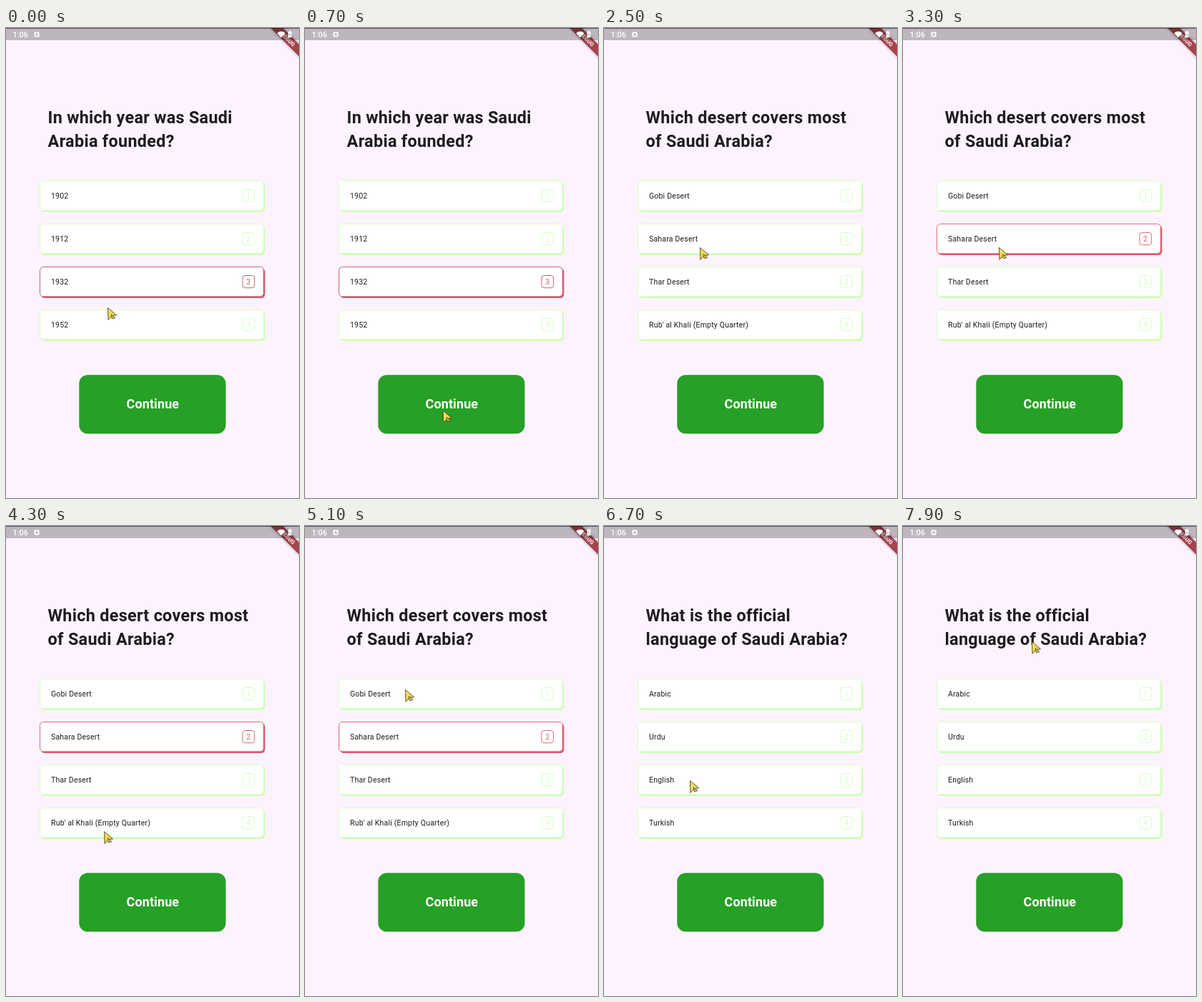
These frames come from a looping animation (410x656 px, 8 s). An HTML page:

```html
<!DOCTYPE html>
<html lang="en">
<head>
<meta charset="utf-8">
<title>Quiz</title>
<style>
  html, body { margin: 0; width: 100%; height: 100%; overflow: hidden; background: #fdf3ff; }
  svg { display: block; width: 410px; height: 656px; font-family: Roboto, sans-serif; }
  .title { font-size: 23.4px; font-weight: 700; letter-spacing: .29px; fill: #1d1b20; }
  .label { font-size: 10.5px; letter-spacing: .19px; fill: #1d1b20; }
  .num { font-size: 10.5px; text-anchor: middle; }
</style>
</head>
<body>
<svg viewBox="0 0 410 656">
  <defs>
    <linearGradient id="gold" x1="0" y1="0" x2="1" y2="1">
      <stop offset="0" stop-color="#f3e96b"/>
      <stop offset="1" stop-color="#e9c53c"/>
    </linearGradient>
    <filter id="soft" x="-20%" y="-100%" width="140%" height="300%">
      <feGaussianBlur stdDeviation="2"/>
    </filter>
  </defs>
  <rect width="410" height="656" fill="#fdf3ff"/>
  <text class="title" x="58.6" y="132.8"></text>
  <text class="title" x="58.6" y="166.1"></text>
  <g id="cards"></g>
  <rect x="102.3" y="484.2" width="205.2" height="82" rx="12" fill="#26a026"/>
  <text x="205.4" y="531.4" font-size="18" font-weight="700" letter-spacing=".1" text-anchor="middle" fill="#fff">Continue</text>

  <g transform="translate(410 0) rotate(45)">
    <rect x="-40" y="16" width="80" height="12" fill="#000" opacity=".35" filter="url(#soft)"/>
    <rect x="-40" y="16" width="80" height="12" fill="#a5434b"/>
    <text y="24.8" font-size="7.8" font-weight="900" text-anchor="middle" fill="#f6e4e6">DEBUG</text>
  </g>
  <rect width="410" height="17" fill="#000" opacity=".25"/>
  <rect width="410" height="1" fill="#000" opacity=".55"/>
  <text x="9.5" y="13" font-size="10.8" font-weight="500" fill="#fff">1:06</text>
  <rect x="39.5" y="5.5" width="7" height="7" rx="1.2" fill="#fff"/>
  <path d="M41.4 11L43 7L44.6 11M42 9.8H44" fill="none" stroke="#a79fa8" stroke-width=".9"/>
  <path d="M379.3 7.2Q385 2.4 390.7 7.2L385 13.6Z" fill="#fff"/>
  <path d="M394.8 5.2H396V4.2H398.4V5.2H399.6V13.2H394.8Z" fill="#fff"/>
  <path d="M397.6 6.6L396 9.6H398.4L396.9 12" fill="none" stroke="#a79fa8" stroke-width=".7"/>

  <g id="cursor" fill="url(#gold)" stroke="#4a4228" stroke-width=".9" stroke-linejoin="round">
    <path d="M.5 .5L12.5 10.8L6.4 11.6L1 17.4Z"/>
    <path d="M5.4 9.8L10.8 14.6L6.2 15.6Z"/>
  </g>
</svg>
<script>
const LOOP = 8000, TICK = 100;
const GREEN = '#ccffb0', PALE = '#d6ffc2', RED = '#dc5a6c';
const NS = 'http://www.w3.org/2000/svg';

const quiz = [
  { at: 0, title: ['In which year was Saudi', 'Arabia founded?'],
    answers: ['1902', '1912', '1932', '1952'], pick: 2, pickAt: 0, tone: '#c0606f' },
  { at: 1600, title: ['Which desert covers most', 'of Saudi Arabia?'],
    answers: ['Gobi Desert', 'Sahara Desert', 'Thar Desert', "Rub' al Khali (Empty Quarter)"],
    pick: 1, pickAt: 2800, tone: '#e06675' },
  { at: 5700, title: ['What is the official', 'language of Saudi Arabia?'],
    answers: ['Arabic', 'Urdu', 'English', 'Turkish'], pick: -1, pickAt: LOOP }
];

// Pointer stops: time, x, y
const stops = [
  [0, 142, 390], [800, 195, 540], [1400, 194, 538], [1800, 212, 532],
  [2500, 134, 306], [3500, 134, 306], [4000, 129, 360], [4300, 137, 426],
  [5000, 141, 229], [5100, 140, 228], [5600, 200, 545], [5900, 204, 547],
  [6500, 114, 360], [6700, 120, 355], [7500, 134, 142], [7700, 190, 156],
  [7900, 180, 161]
];

function add(parent, tag, attrs) {
  const el = document.createElementNS(NS, tag);
  for (const k in attrs) el.setAttribute(k, attrs[k]);
  return parent.appendChild(el);
}

const titles = document.querySelectorAll('.title');
const cursor = document.getElementById('cursor');
const cards = [0, 1, 2, 3].map(i => {
  const g = add(document.getElementById('cards'), 'g', { transform: `translate(0 ${213 + 60 * i})` });
  const shade = add(g, 'rect', { x: 49, y: 2, width: 313.5, height: 42, rx: 5.5 });
  const face = add(g, 'rect', { x: 47.5, y: .5, width: 313, height: 41.3, rx: 5, fill: '#fff' });
  const label = add(g, 'text', { class: 'label', x: 63, y: 24.8 });
  const box = add(g, 'rect', { x: 331, y: 12.5, width: 16.7, height: 17.2, rx: 3.5, fill: 'none' });
  const num = add(g, 'text', { class: 'num', x: 339.3, y: 24.9 });
  num.textContent = i + 1;
  return { shade, face, label, box, num };
});

function pointerAt(t) {
  const i = stops.findIndex(s => s[0] > t);
  if (i < 0) return stops[stops.length - 1].slice(1);
  const a = stops[i - 1], b = stops[i];
  const u = (t - a[0]) / (b[0] - a[0]), e = u * u * (3 - 2 * u);
  return [a[1] + (b[1] - a[1]) * e, a[2] + (b[2] - a[2]) * e];
}

function draw(t) {
  const q = quiz.filter(s => s.at <= t).pop();
  q.title.forEach((line, i) => titles[i].textContent = line);
  cards.forEach((c, i) => {
    const on = i === q.pick && t >= q.pickAt;
    const ink = on ? q.tone : PALE;
    c.label.textContent = q.answers[i];
    c.shade.setAttribute('fill', on ? RED : GREEN);
    c.face.setAttribute('stroke', ink);
    c.box.setAttribute('stroke', ink);
    c.num.setAttribute('fill', ink);
  });
  cursor.setAttribute('transform', `translate(${pointerAt(t)})`);
}

let start;
function frame(now) {
  if (start === undefined) start = now;
  const t = (now - start) % LOOP;
  draw(Math.floor(t / TICK) * TICK);
  requestAnimationFrame(frame);
}
draw(0);
requestAnimationFrame(frame);
</script>
</body>
</html>
```
